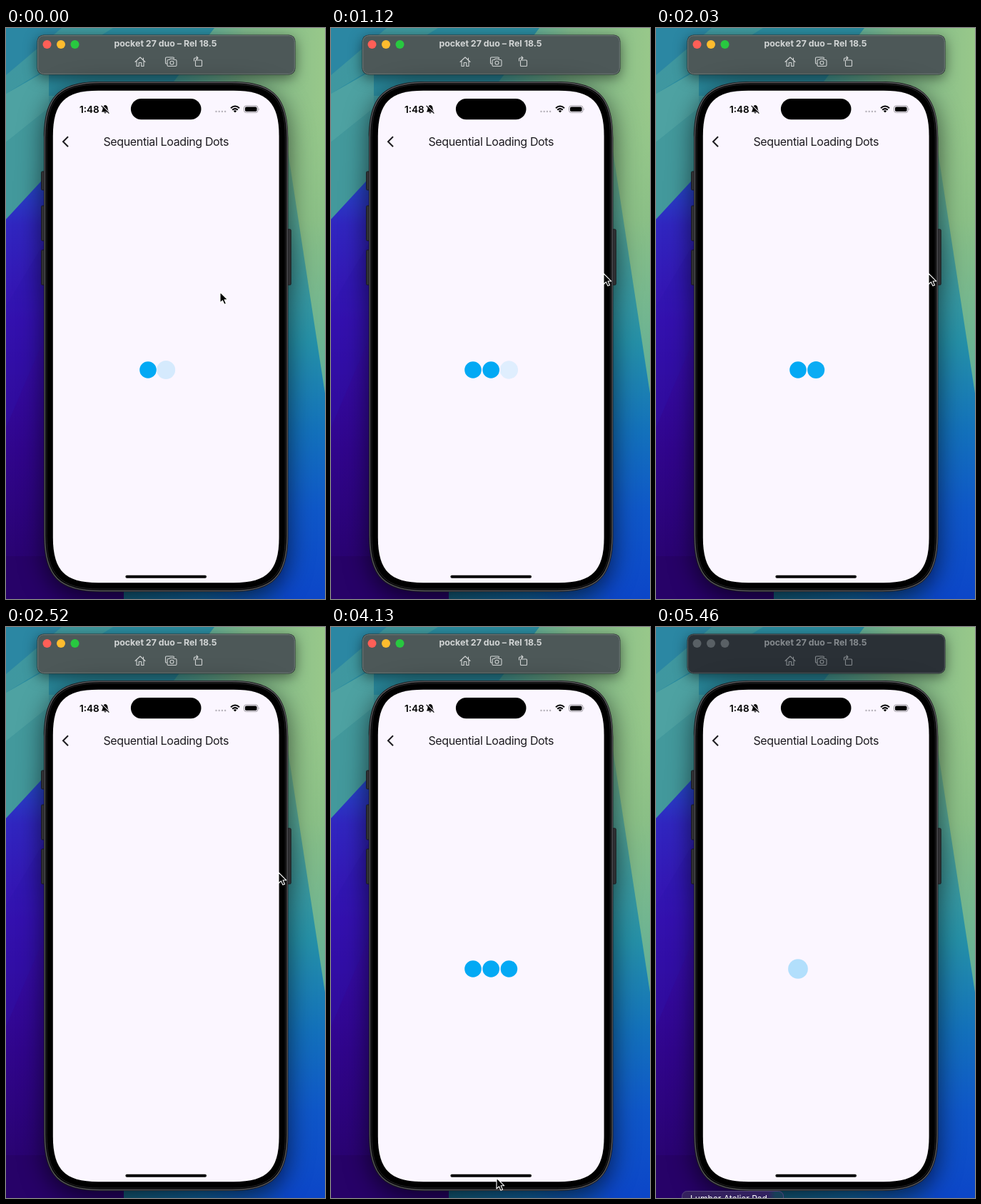
Recreate the animation shown at these times as an HTML page. Size 447 px wide and 800 px high, loop 5.53 s.

```html
<!DOCTYPE html>
<html lang="en">
<head>
<meta charset="utf-8">
<title>Sequential Loading Dots</title>
<style>
  html, body { margin: 0; width: 100%; height: 100%; overflow: hidden; }
  svg { display: block; width: 447px; height: 800px; font-family: Inter, "Liberation Sans", sans-serif; }
  #phone { filter: drop-shadow(0 9px 17px rgba(0,0,0,.6)); }
  #bar { --fill: #4d5858; --ink: #d2d5d5; --rim: #717c7b; filter: drop-shadow(0 5px 9px rgba(0,0,0,.5)); }
  #bar.idle { --fill: #2a3036; --ink: #858a8e; --rim: #50575c; }
  #bar.idle circle { fill: #596065; }
  .panel { fill: var(--fill); stroke: var(--rim); }
  .name { fill: var(--ink); }
  .icons { fill: none; stroke: var(--ink); stroke-width: 1.1; stroke-linejoin: round; stroke-linecap: round; }
</style>
</head>
<body>
<svg viewBox="0 0 447 800">
  <defs>
    <linearGradient id="sky">
      <stop offset="0" stop-color="#3f97a0"/><stop offset=".5" stop-color="#3f9a9c"/>
      <stop offset=".75" stop-color="#7eb78a"/><stop offset="1" stop-color="#98c88a"/>
    </linearGradient>
    <linearGradient id="meadow" x2="0" y2="1">
      <stop offset="0" stop-color="#90c488" stop-opacity="0"/>
      <stop offset=".4" stop-color="#8abf86"/><stop offset="1" stop-color="#5fae98"/>
    </linearGradient>
    <linearGradient id="indigo" x2="0" y2="1">
      <stop offset="0" stop-color="#2350cc"/><stop offset=".12" stop-color="#3026c0"/>
      <stop offset=".35" stop-color="#360fae"/><stop offset=".65" stop-color="#30058c"/>
      <stop offset="1" stop-color="#270268"/>
    </linearGradient>
    <linearGradient id="blue" gradientUnits="userSpaceOnUse" x1="0" y1="180" x2="0" y2="800">
      <stop offset="0" stop-color="#6db08c"/><stop offset=".2" stop-color="#4a9f98"/>
      <stop offset=".42" stop-color="#2590a8"/><stop offset=".62" stop-color="#1371bb"/>
      <stop offset=".8" stop-color="#0f57c8"/><stop offset="1" stop-color="#0c46c8"/>
    </linearGradient>
    <linearGradient id="floor">
      <stop offset="0" stop-color="#145e7c"/><stop offset=".5" stop-color="#1062a0"/>
      <stop offset="1" stop-color="#0c48c8"/>
    </linearGradient>
    <linearGradient id="label">
      <stop offset="0" stop-color="#34205e"/><stop offset=".85" stop-color="#32215f"/><stop offset=".92" stop-color="#173f58"/>
    </linearGradient>
  </defs>

  <rect width="447" height="800" fill="url(#sky)"/>
  <path d="M0 0H78L0 66Z" fill="#2b87a3"/>
  <path d="M150 0H292L220 95H60L0 160V92Z" fill="#2a8b9f"/>
  <path d="M0 92L60 58V112L0 160Z" fill="#4ea2a2"/>
  <path d="M0 160L60 112V205L0 268Z" fill="#43999c"/>
  <path d="M0 268L60 203V800H0Z" fill="url(#indigo)"/>
  <path d="M0 390L60 290V420L0 560Z" fill="#2c16ad" opacity=".3"/>
  <rect x="390" y="100" width="57" height="420" fill="url(#meadow)"/>
  <path d="M390 140L447 512V800H390Z" fill="url(#blue)"/>
  <path d="M0 740H165V800H0Z" fill="#270268"/>
  <rect x="165" y="740" width="225" height="60" fill="url(#floor)"/>

  <g id="bar">
    <rect x="43.5" y="9.5" width="362" height="56" rx="9" fill="#2b3333"/>
    <rect class="panel" x="44.7" y="10.7" width="359.6" height="53.6" rx="8"/>
    <circle cx="57.5" cy="23" r="6" fill="#ff5f57"/>
    <circle cx="77" cy="23" r="6" fill="#febc2e"/>
    <circle cx="96.5" cy="23" r="6" fill="#28c840"/>
    <text class="name" x="223.5" y="26" text-anchor="middle" font-size="12.4" font-weight="700">pocket 27 duo – Rel 18.5</text>
    <g class="icons">
      <path d="M181 47.5L188 41L195 47.5M183 46V53.5H186.3V48.5H189.7V53.5H193V46M192.5 44.5V42"/>
      <path d="M225.5 50H224.5Q223.5 50 223.5 49V42.5Q223.5 41 225 41H234Q235.5 41 235.5 42.5M227.5 44.5H229L230 43.3H234.5L235.5 44.5H237.5Q239 44.5 239 46V52Q239 53.5 237.5 53.5H227.5Q226 53.5 226 52V46Q226 44.5 227.5 44.5Z"/>
      <circle cx="232.5" cy="48.8" r="2.5" style="fill:none"/>
      <path d="M266 45H273.5Q274.5 45 274.5 46V52.5Q274.5 53.5 273.5 53.5H266.5Q265.5 53.5 265.5 52.5V45.5M263.5 46V43.5Q263.5 42 265 42H269M267 40L269 42L267 44"/>
    </g>
  </g>

  <g id="phone">
    <g fill="#303033" stroke="#161618" stroke-width=".8">
      <rect x="49.5" y="201" width="7" height="26" rx="1.5"/>
      <rect x="49.5" y="249" width="7" height="49" rx="1.5"/>
      <rect x="49.5" y="311" width="7" height="49" rx="1.5"/>
      <rect x="392" y="282" width="7.3" height="78" rx="1.5"/>
    </g>
    <path id="body" fill="#1b1b1d"/>
    <path id="rim" stroke="#56565a" stroke-width="1.4"/>
    <path id="bezel" stroke="#242426"/>
  </g>
  <path id="screen" fill="#fbf6ff"/>

  <text x="103" y="119" font-size="13.5" font-weight="600">1:48</text>
  <path d="M133.8 117.4Q135.6 115.8 135.6 112.6Q135.8 108.5 139 108Q142.4 108.5 142.5 112.6Q142.5 115.8 144.4 117.4ZM137.2 118.2H140.8Q139 120.6 137.2 118.2Z"/>
  <path d="M134.6 108.2L145 118.6" stroke="#fbf6ff" stroke-width="1.2"/>
  <path d="M133.6 108.8L144.4 119.6" stroke="#000" stroke-width="1.2"/>
  <rect x="174.9" y="99" width="98.6" height="29.2" rx="14.6"/>
  <path d="M294.5 117H308" stroke="#b9b5bd" stroke-width="2.5" stroke-linecap="round" stroke-dasharray="0 4.2"/>
  <g fill="none" stroke="#000" stroke-width="2">
    <path d="M315 112.3Q321 106.8 327 112.3M317.2 114.8Q321 111.4 324.8 114.8"/>
  </g>
  <path d="M318.8 116.2Q321 114.4 323.2 116.2L321 118.6Z"/>
  <rect x="333.5" y="109" width="19.5" height="9.5" rx="3" fill="none" stroke="#9c99a0"/>
  <rect x="335" y="110.5" width="16.5" height="6.5" rx="1.8"/>
  <path d="M354.3 112.2Q356 113.8 354.3 115.4Z" fill="#9c99a0"/>

  <path d="M87 152.3L80 159.3L87 166.3" fill="none" stroke="#1d1b20" stroke-width="2"/>
  <text x="224.3" y="165" text-anchor="middle" font-size="16" letter-spacing="-.36" fill="#1d1b20">Sequential Loading Dots</text>
  <rect x="167.4" y="766.8" width="113.6" height="3.9" rx="1.95"/>

  <g id="dots" fill="#03a9f4">
    <circle cx="199" cy="479"/><circle cx="224.2" cy="479"/><circle cx="249.4" cy="479"/>
  </g>

  <g id="tip">
    <rect x="36.5" y="790.5" width="142" height="24" rx="7" fill="url(#label)" stroke="#54437c"/>
    <text x="48" y="805" font-size="12" fill="#fff">Lumber Atelier Pad</text>
  </g>
  <path id="cursor" d="M0 0V15L3.4 11.8L5.9 17.3L8.5 16.2L6.1 10.8H10.8Z" stroke="#fff" stroke-width="1.1" stroke-linejoin="round"/>
</svg>
<script>
const LOOP = 5530, STEP = 70;
const CYCLE = 937, LEAD = 218, GROW = 190, VANISH = 815;
// Pointer stops: time, x, y
const stops = [
  [0, 300, 370], [560, 300, 370], [630, 338, 356], [770, 382, 344],
  [2870, 382, 344], [3080, 262, 225], [3290, 147, 111], [3400, 147, 111],
  [3640, 325, 330], [3850, 345, 585], [3990, 307, 690], [4130, 232, 772],
  [4200, 165, 815], [LOOP, 165, 815]
];
const get = id => document.getElementById(id);
const bar = get('bar'), tip = get('tip'), cursor = get('cursor');
const dots = [...get('dots').children];

// Rectangle with smooth corners: each curve spans e, its handles end c from the corner
function squircle(id, inset, r) {
  const x = 53 + inset, y = 75 + inset, w = 342.4 - 2 * inset, h = 715 - 2 * inset;
  const e = r * 1.3, c = r * .343, a = e - c;
  get(id).setAttribute('d', `M${x + e} ${y}h${w - 2 * e}c${a} 0 ${e} ${c} ${e} ${e}
    v${h - 2 * e}c0 ${a} ${-c} ${e} ${-e} ${e}h${2 * e - w}c${-a} 0 ${-e} ${-c} ${-e} ${-e}
    v${2 * e - h}c0 ${-a} ${c} ${-e} ${e} ${-e}z`);
}
squircle('body', 0, 61);
squircle('rim', 1.5, 59.5);
squircle('bezel', 4, 57);
squircle('screen', 12.8, 49);

function pointer(t) {
  const i = stops.findIndex(s => s[0] > t);
  const [t0, x0, y0] = stops[i - 1], [t1, x1, y1] = stops[i];
  const p = (t - t0) / (t1 - t0);
  return [x0 + (x1 - x0) * p, y0 + (y1 - y0) * p];
}

function draw(now) {
  const t = Math.floor(now % LOOP / STEP) * STEP;
  const phase = (t + LEAD) % CYCLE;
  dots.forEach((dot, i) => {
    const p = phase < VANISH ? Math.max(0, Math.min(1, phase / GROW - i)) : 0;
    dot.setAttribute('r', 11.8 * (1 + .22 * Math.sin(Math.PI * p)));
    dot.setAttribute('opacity', p);
  });
  cursor.setAttribute('transform', `translate(${pointer(t)})`);
  bar.classList.toggle('idle', t >= 5320);
  tip.style.display = t >= 4410 ? '' : 'none';
  requestAnimationFrame(draw);
}
requestAnimationFrame(draw);
</script>
</body>
</html>
```
